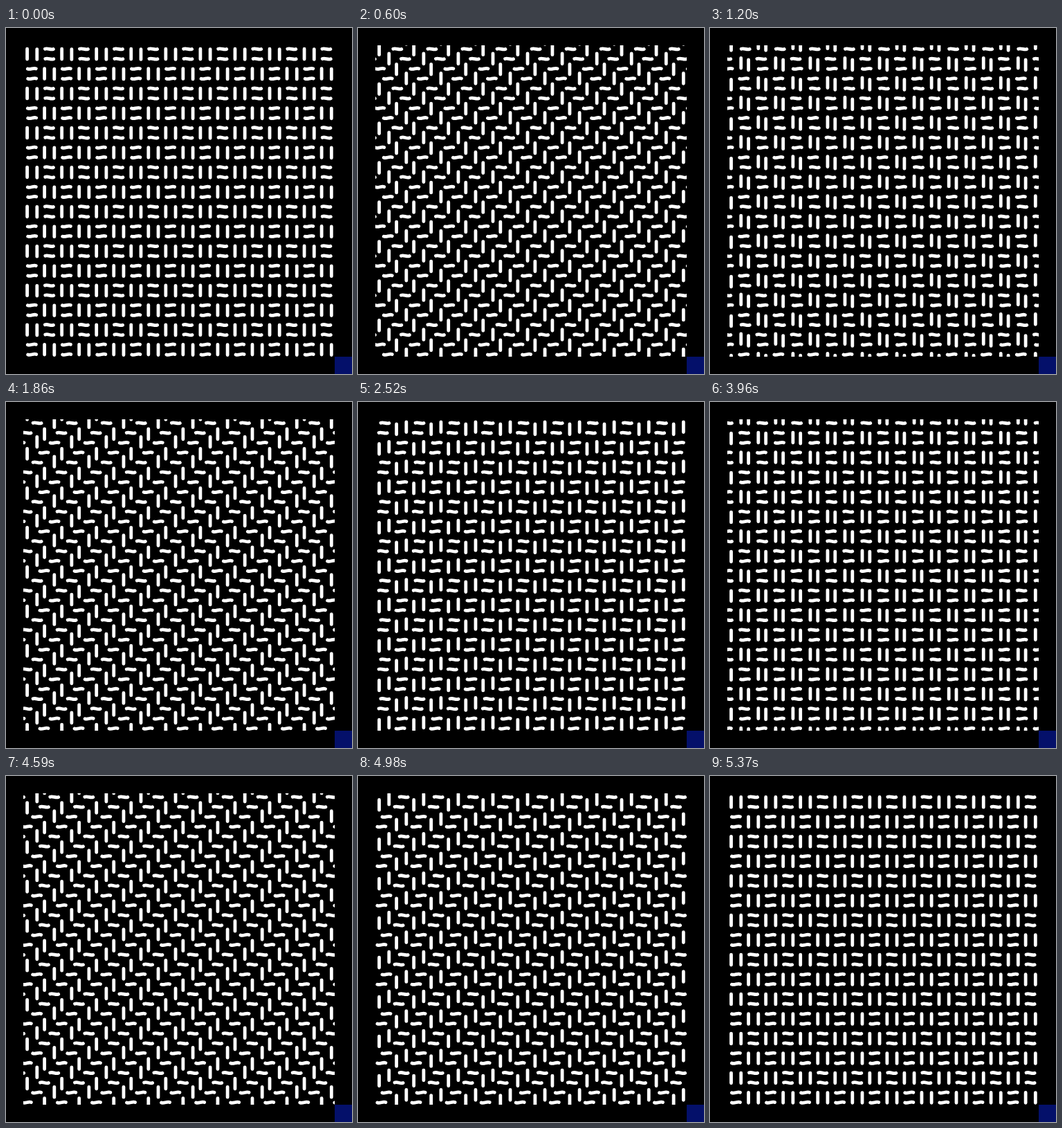
Recreate the animation shown at these times as an HTML page. Size 500x500 px, loop 5.43 s.

```html
<!DOCTYPE html>
<html lang="en">
<head>
<meta charset="utf-8">
<title>Woven strands</title>
<style>
  html, body { margin: 0; width: 100%; height: 100%; overflow: hidden; background: #000; }
  svg { display: block; width: 100%; height: 100%; }
</style>
</head>
<body>
<svg viewBox="0 0 500 500">
  <defs>
    <clipPath id="cloth"><rect x="25" y="25" width="450" height="450"/></clipPath>
  </defs>
  <rect width="500" height="500"/>
  <g clip-path="url(#cloth)">
    <g id="strands" fill="none" stroke="#fff" stroke-width="4.8" stroke-linecap="round"></g>
  </g>
  <rect x="475" y="475" width="25" height="25" fill="#04106a"/>
</svg>
<script>
const LOOP = 5430;
const FRAME = 30;
const TRAVEL = 5380; // time for a dash to move one full period
const LEAD = 20;
const PERIOD_X = 50.06;
const PERIOD_Y = 56.95;

const holder = document.getElementById('strands');
const strands = [];

function addStrand(vertical, index, dash) {
  const path = document.createElementNS('http://www.w3.org/2000/svg', 'path');
  let d = '';
  for (let n = -2; n < 11; n++) d += dash(n);
  path.setAttribute('d', d);
  holder.appendChild(path);
  strands.push({ path, vertical, direction: index % 2 ? 1 : -1 });
}

for (let i = 0; i < 36; i++) {
  const pair = i >> 1;
  const x = (i % 2 ? 44.8 : 30.6) + pair * PERIOD_X / 2;
  const start = 37.8 + (pair % 2) * PERIOD_Y / 2;
  addStrand(true, i, n => `M${x} ${start + n * PERIOD_Y - 7.4}v14.8`);
}

for (let i = 0; i < 32; i++) {
  const odd = (i >> 1) % 2;
  const y = 30.4 + i * PERIOD_Y / 4;
  const start = odd ? 37.5 : 62.6;
  const wave = odd ? -1 : 1;
  addStrand(false, i, n =>
    `M${start + n * PERIOD_X - 6} ${y - 0.2 * wave}c4 ${-1.6 * wave} 8 ${2 * wave} 12 ${0.4 * wave}`);
}

function draw(time) {
  const frameTime = Math.floor(time / FRAME) * FRAME;
  const turn = Math.min(1, (frameTime + LEAD) / TRAVEL);
  for (const { path, vertical, direction } of strands) {
    const shift = direction * turn * (vertical ? PERIOD_Y : PERIOD_X);
    path.setAttribute('transform', vertical ? `translate(0 ${shift})` : `translate(${shift} 0)`);
  }
}

function tick() {
  draw(performance.now() % LOOP);
  requestAnimationFrame(tick);
}
tick();
</script>
</body>
</html>
```
